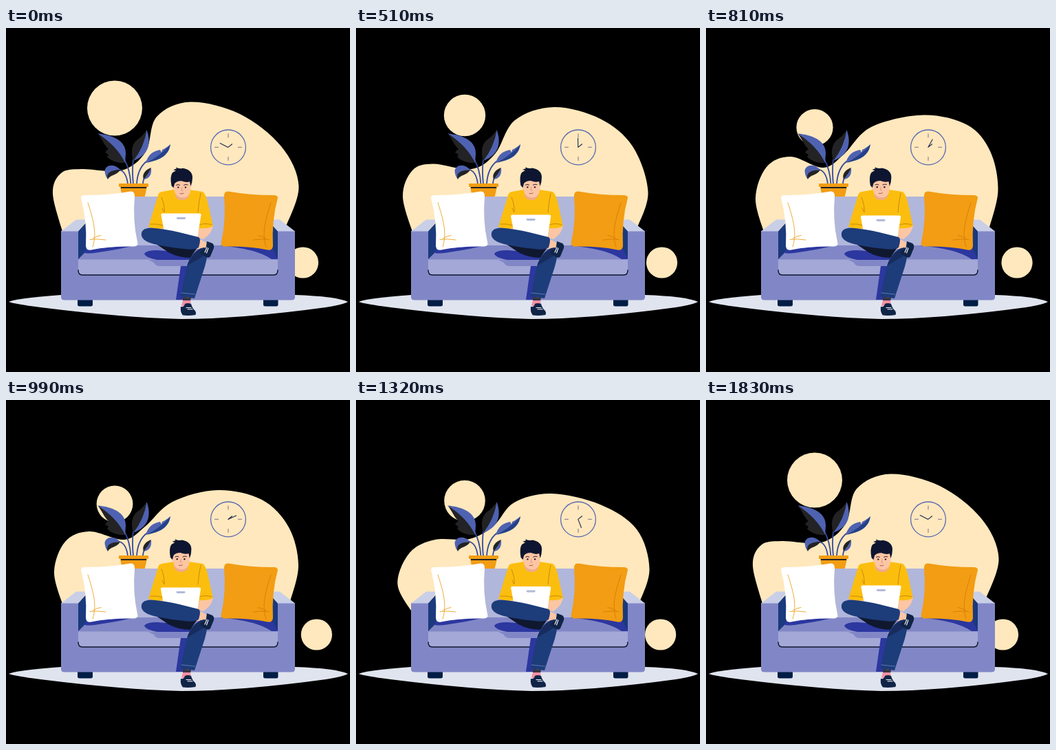
Recreate the animation shown at these times as an HTML page with a canvas. Size 500 by 500 pixels, loop 1.86 s.

```html
<!DOCTYPE html>
<html lang="en">
<head>
<meta charset="utf-8">
<title>Working on the sofa</title>
<style>
html, body { margin: 0; width: 100%; height: 100%; overflow: hidden; background: #000; }
canvas { display: block; width: 500px; height: 500px; }
</style>
</head>
<body>
<canvas id="stage" width="500" height="500"></canvas>
<script>
const ctx = document.getElementById('stage').getContext('2d');
const LOOP = 1860, STEP = 30;
const CREAM = '#ffe8bd', NAVY = '#1d3c7a', DARK = '#10182f', ORANGE = '#f29d13',
  BLUE = '#4f62b2', BODY = '#8187c6', SHADE = '#2c379f', SKIN = '#fcc6a4', INK = '#232325';

// Key times and values; the pose holds after the last key.
const TIMES = [0, 510, 810, 990, 1320, 1560, 1830];
const DISC_Y = [116.5, 127, 144.5, 151, 146.5, 122.3, 116.5];
const DISC_R = [40, 30.2, 26.6, 26.4, 29.8, 35.8, 40];
const DOT_X = [431.5, 444.5, 452, 451.4, 442.6, 435.6, 431.5];
const MINUTE = [-63, -1, 29, 66, 159, 229, 297];

// Twelve outline points per pose, left to right over the top.
const BLOB = [
  '84 302 68 241 80 211 110 205 168 207 203 180 219 129 268 107.5 340 125 400 172 425.5 230 405 293',
  '84 302 68 245 82 207 112 197.5 168 205 202 183 231 134 288 115 355 132 402 172 424.5 238 408 292',
  '86 302 72 248 88 202 123 187 170 203 200 184 240 144 316 126.5 380 141 413 179 424.5 235 412 290',
  '84 302 70 250 86 206 121 191 172 203 202 184 242 148 308 131 372 145 411 185 425 240 413 293',
  '84 312 60.5 268 78 222 115 203 165 202 200 183 230 149 284 136 355 152 408 188 426.5 246 410 299',
  '84 305 65 262 80 218 115 204 166 206 200 182 220 142 282 123 350 141 402 182 424 240 409 292'
].map(s => s.split(' ').map(Number));
BLOB.push(BLOB[0]);
const BLOB_KEYS = BLOB[0].map((_, i) => BLOB.map(pose => pose[i]));

// Monotone cubic interpolation, at rest at both ends.
function slope(v, i) {
  if (i === 0 || i === v.length - 1) return 0;
  const a = (v[i] - v[i - 1]) / (TIMES[i] - TIMES[i - 1]);
  const b = (v[i + 1] - v[i]) / (TIMES[i + 1] - TIMES[i]);
  return a * b <= 0 ? 0 : 2 * a * b / (a + b);
}
function at(v, t) {
  const last = TIMES.length - 1;
  if (t >= TIMES[last]) return v[last];
  let i = 0;
  while (t >= TIMES[i + 1]) i++;
  const h = TIMES[i + 1] - TIMES[i], u = (t - TIMES[i]) / h, w = 1 - u;
  return v[i] * (1 + 2 * u) * w * w + v[i + 1] * u * u * (3 - 2 * u)
    + h * u * w * (slope(v, i) * w - slope(v, i + 1) * u);
}

const paths = {};
const path = d => paths[d] || (paths[d] = new Path2D(d));
function fill(color, d) { ctx.fillStyle = color; ctx.fill(path(d)); }
function line(color, width, d) {
  ctx.strokeStyle = color; ctx.lineWidth = width;
  ctx.lineCap = ctx.lineJoin = 'round';
  ctx.stroke(path(d));
}
function disc(x, y, r, color) {
  ctx.fillStyle = color;
  ctx.beginPath(); ctx.arc(x, y, r, 0, 7); ctx.fill();
}
function moved(dx, dy, draw) {
  ctx.save(); ctx.translate(dx, dy); draw(); ctx.restore();
}

function blob(t) {
  const v = BLOB_KEYS.map(k => at(k, t)), n = v.length / 2;
  const p = i => { i = Math.max(0, Math.min(n - 1, i)); return [v[2 * i], v[2 * i + 1]]; };
  ctx.fillStyle = CREAM;
  ctx.beginPath();
  ctx.moveTo(...p(0));
  for (let i = 0; i < n - 1; i++) {
    const [a, b, c, d] = [p(i - 1), p(i), p(i + 1), p(i + 2)];
    ctx.bezierCurveTo(b[0] + (c[0] - a[0]) / 6, b[1] + (c[1] - a[1]) / 6,
      c[0] - (d[0] - b[0]) / 6, c[1] - (d[1] - b[1]) / 6, c[0], c[1]);
  }
  ctx.lineTo(390, 340); ctx.lineTo(110, 340);
  ctx.fill();
}

function clock(t) {
  ctx.strokeStyle = '#5a68b4'; ctx.lineWidth = 1.3;
  ctx.beginPath(); ctx.arc(323, 173.4, 25.4, 0, 7); ctx.stroke();
  line('#77728f', 1, 'M323 154V159M323 187.500V192.500M303.500 173.300H308.500M337.500 173.300H342.500');
  const a = at(MINUTE, t) * Math.PI / 180;
  ctx.strokeStyle = '#20264d'; ctx.lineWidth = 1.1;
  ctx.beginPath();
  ctx.moveTo(328.6, 168.8); ctx.lineTo(322.8, 173.4);
  ctx.lineTo(322.8 + 13 * Math.sin(a), 173.4 - 13 * Math.cos(a));
  ctx.stroke();
}

function plant() {
  line('#33499c', 1.8, 'M165 206Q175 209 177 227M172 191Q180 205 181.500 227M185 190Q183 208 185 227M204 194Q191 205 190 227M202 217Q199 221 199 227');
  fill(BLUE, 'M133.500 153.500C153 155 175 163 174 183L173 196Q160 172 133.500 153.500Z');
  fill(INK, 'M133.500 153.500Q162 172 173 196C163 197 152 193 147 187L149 184L144 181Q146 177 149 176C143 171 140 162 133.500 153.500Z');
  fill(BLUE, 'M204.500 148C211 166 209 184 185 193Q200 172 204.500 148Z');
  fill(INK, 'M204.500 148Q201 173 185 193C181 180 183 169 190 163Q199 157 204.500 148Z');
  fill(BLUE, 'M239 169Q232 175 227 177L226 181L224 177C213 179 207 184 203 196Q225 186 239 169Z');
  fill('#24408a', 'M239 169C237 184 226 192 203 196Q224 186 239 169Z');
  fill(BLUE, 'M166 206C157 196 144 199 143.500 208Q144 215 148 220Q147 207 166 206Z');
  fill(INK, 'M166 206C161 215 151 213 148 220Q143 207 166 206Z');
  fill(INK, 'M211 203C203 206 197 212 200 220Q208 212 211 203Z');
  fill(BLUE, 'M211 203C212 214 208 219 200 220Q207 213 211 203Z');
  fill(ORANGE, 'M166 231H205L201.500 246H169Z');
  fill(INK, 'M167 231H204V233H167Z');
  fill(ORANGE, 'M165 226H206Q207 226 207 227V230Q207 231 206 231H165Q164 231 164 230V227Q164 226 165 226Z');
}

function pillow(color, seam) {
  fill(color, 'M109 247Q109 243 115 243Q150 243 181 237.500Q187 237 187 244Q184 280 191 311Q193 317 186 317.500Q150 317 124 322.500Q117 324 116 317Q118 280 109 247Z');
  line(seam, 0.9, 'M119 254C126 276 133 298 126 318M122 307.500Q133 306 145 308M126 306Q133 302 138 301.500');
}

function sofa() {
  fill('#001d45', 'M104 394H126V402Q126 404.500 123 404.500H107Q104 404.500 104 402ZM374 394H395.500V402Q395.500 404.500 393 404.500H377Q374 404.500 374 402Z');
  fill('#b1b6db', 'M116 245H384V320H116Z');
  fill(BODY, 'M80 295H105V316H395V295H420V391Q420 395.500 415 395.500H85Q80 395.500 80 391Z');
  fill('#c9cfe7', 'M80 295.500L102 278.500H118L105 295.500ZM420 295.500L398 278.500H382L395 295.500Z');
  fill('#1b397d', 'M105 295.500L117 282V324L105 336ZM395 295.500L383 282V324L395 336Z');
  fill(SHADE, 'M116 322L190 315Q170 321 135 326Q115 329 114 326ZM310 316L386 318L395 336H386Q365 321 310 316Z');
  fill('#a3a8d6', 'M105 336.500H395V353Q395 358.500 389 358.500H111Q105 358.500 105 353Z');
  line('#11182f', 1.5, 'M105 352Q105 359 111 359H389Q395 359 395 352');
  fill(SHADE, 'M201 328Q204 323 220 323L270 327V337H220Q203 334 201 328Z');
  fill(BODY, 'M207 337H265L262 346H222Q216 345 215 341Z');
  fill(SHADE, 'M254 346H268L262 395H247Z');
}

function head() {
  fill('#eeaa8c', 'M245 233H265V244Q262 250 255 250Q247 250 245 243Z');
  fill(SKIN, 'M243 220H267.500V231Q268 242 261 245.500Q255 248 249 244.500Q244 241 243.500 235Q240 233 241 227Z');
  fill('#0e1530', 'M239.500 229Q237 215 241 210L246 207L242 206L247 204L246 202Q250 205 256 203.500Q270 206 270 217Q270 224 267.500 230L266 223Q261 225 254 222Q247 222 244 226L242.500 232Z');
  line('#34202a', 1, 'M246.500 228Q249 226.500 251.500 228M257.500 228Q260 226.500 263 227.500');
  disc(249.3, 231.3, 1.2, '#241c2a');
  disc(260, 231.3, 1.2, '#241c2a');
  line('#d98d77', 0.8, 'M255 231L254 236H256');
  line('#9d4e4d', 0.9, 'M252 240.500Q255 241 257 240');
}

function person(u) {
  fill(SKIN, 'M280 288L301 287Q300 298 287 307L276 304ZM209 288H230L226 298H212Z');
  fill('#fcbe0e', 'M244 235Q255 254 266 235L286 238Q290 241 293 252L301 288Q292 292 281 291L278 304H232L229 291Q218 293 207 289L221 243Q222 239 226 238Z');
  line('#c98a0b', 1, 'M226 246Q231 258 230 268L227 262M283 240Q280 254 279 268M210 285Q219 284 228 287M281 286Q290 283 299 286');
  moved(1 - 1.6 * u, 0.3 - 0.4 * u, head);
  moved(-0.5 * u, 3 * u, () => {
    fill('#fff', 'M228 269.500H281Q284 269.500 283.500 272L278 307H232L225.500 272Q225 269.500 228 269.500Z');
    fill('#b4b9d8', 'M249 275H260Q261.500 275 261 276.500Q260.500 278 259 278H250Q248.500 278 248 276.500Q247.500 275 249 275Z');
  });

  fill(SKIN, 'M278 307L284 308L295 314L289 321L277 321Z');
  fill(DARK, 'M214 311Q246 322 278 319L268 334Q251 334 236 326Z');
  fill(NAVY, 'M262 350Q265 330 283 320L294 319Q292 340 286 356L274 393L253.500 390Z');
  fill('#172c5d', 'M264 345Q272 323 288 319L293 323Q290 330 283 334Z');
  fill(NAVY, 'M197 302Q195 291 211 290.500Q232 292 252 297L280 304Q284 306 280 319Q274 323 259 321Q221 317 206 311Q198 307 197 302Z');
  line('#7d91bd', 0.7, 'M255 385L274.500 387');
  fill('#102448', 'M292 310L300 313Q303 315 302 320L297 332Q295 335 291 333L283 328Q281 325 285 323Q291 322 291 317Z');
  line('#fff', 1.1, 'M289 326L292 319M291.500 327L294 320');

  fill('#393542', 'M257 391L269 392L268 397H257Z');
  fill('#f590a4', 'M257 396H268L269 404H255Z');
  fill('#102448', 'M254 405Q259 406 260 401Q264 399 269 401Q271 408 275 411Q277 414 275.500 417Q265 418.500 257 417.500Q253 413 254 405Z');
  line('#fff', 1, 'M262 406.500H269M264 408.800H271');
}

function draw(t) {
  const x = at(DOT_X, t), u = (x - 431.5) / 20.5;
  ctx.fillStyle = '#000';
  ctx.fillRect(0, 0, 500, 500);
  blob(t);
  disc(158, at(DISC_Y, t), at(DISC_R, t), CREAM);
  disc(x, 341, 22.6, CREAM);
  clock(t);
  fill('#e0e4ee', 'M4 398Q14 393 80 388H420Q480 390 497 398Q490 402 465 406Q340 423 255 423Q170 421 50 406Q12 401 4 398Z');
  plant();
  sofa();
  pillow('#fff', '#eca323');
  ctx.save();
  ctx.translate(504, 0); ctx.scale(-1, 1);
  pillow(ORANGE, '#d47d08');
  ctx.restore();
  person(u);
}

const start = performance.now();
function tick() {
  const t = (performance.now() - start) % LOOP;
  draw(Math.floor(t / STEP) * STEP);
  requestAnimationFrame(tick);
}
tick();
</script>
</body>
</html>
```
